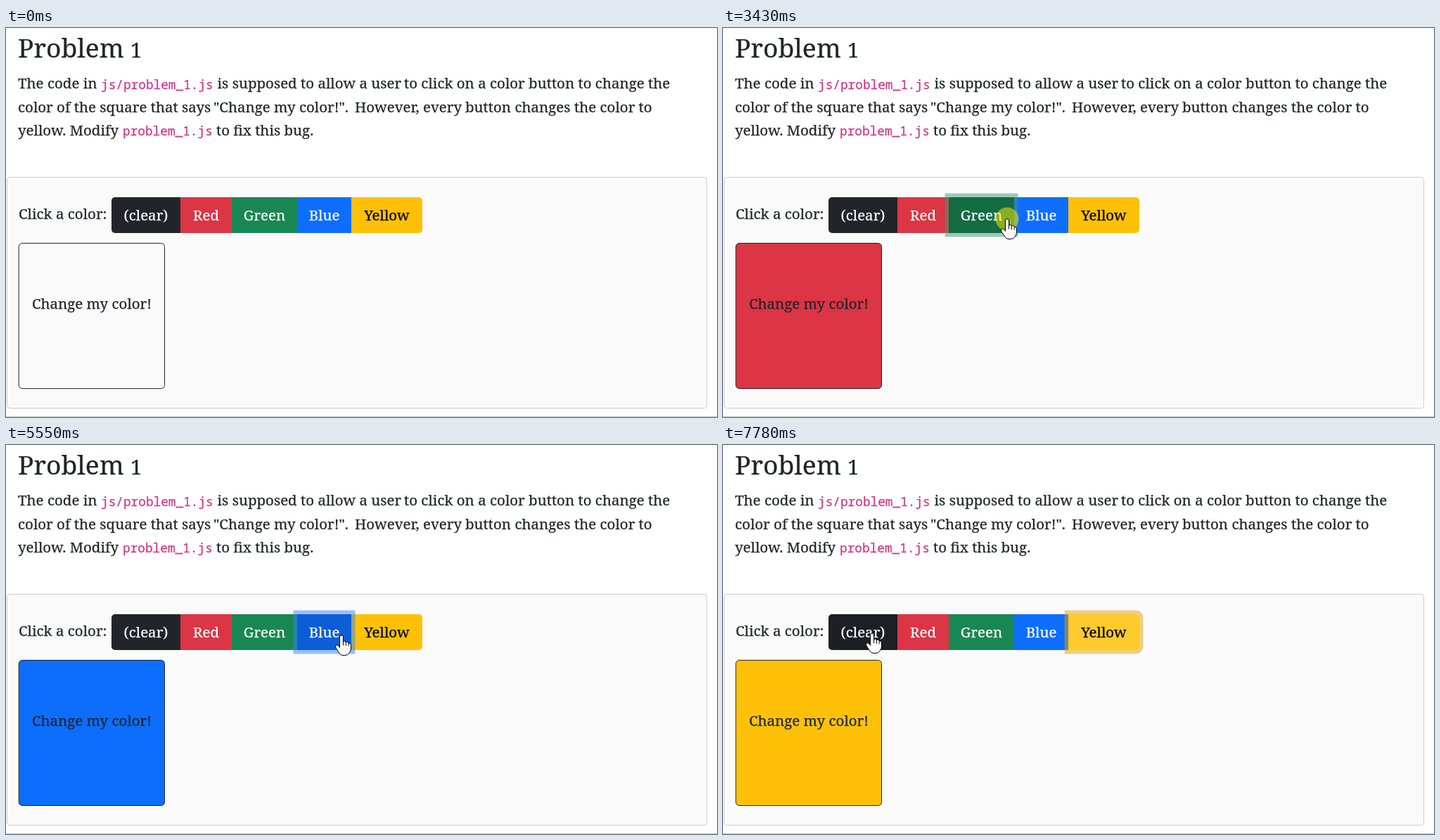
An HTML page for the animation above (8000 ms loop, 1011 px wide and 554 px high).

```html
<!DOCTYPE html>
<html lang="en">
<head>
<meta charset="utf-8">
<title>Color buttons</title>
<style>
  html, body { margin: 0; width: 100%; height: 100%; overflow: hidden; background: #fff; }
  body {
    position: relative; color: #212529;
    font: 20.5px "Noto Serif", Georgia, serif;
    -webkit-text-stroke: .25px;
  }
  svg { position: absolute; left: 0; top: 0; }
  text { fill: #212529; stroke: #212529; stroke-width: .25px; white-space: pre; }
  .code { font: 17.75px "Noto Sans Mono", monospace; fill: #d63384; stroke: #d63384; }
  .btn {
    position: absolute; top: 240.5px; height: 51.5px; line-height: 51px;
    text-align: center; color: #fff; white-space: nowrap;
  }
  .btn:first-child { border-radius: 5px 0 0 5px; }
  .btn:last-child { border-radius: 0 5px 5px 0; color: #000; }
  #overlay { z-index: 5; }
</style>
</head>
<body>
<svg width="1011" height="554">
  <text x="17" y="42" font-size="37.2">Problem</text>
  <text x="177" y="42" font-size="29">1</text>

  <text x="17" y="86">The code in</text>
  <text x="135" y="87" class="code">js/problem_1.js</text>
  <text x="300.5" y="86">is supposed to allow a user</text>
  <text x="566" y="86">to click on a</text>
  <text x="688" y="86">color button</text>
  <text x="813.5" y="86">to change the</text>

  <text x="17" y="119.5">color of the square that says</text>
  <text x="295" y="119.5">"Change my color!".</text>
  <text x="496" y="119.5">However, every</text>
  <text x="653" y="119.5">button changes</text>
  <text x="808" y="119.5">the color to</text>

  <text x="17" y="153">yellow. Modify</text>
  <text x="166" y="153" class="code">problem_1.js</text>
  <text x="299" y="153">to fix this bug.</text>

  <rect x="1.5" y="212.5" width="995" height="329" rx="4" fill="#fafafa" stroke="#ccc"/>
  <path d="M0 553.5H1011" stroke="#c4c4c4"/>
  <text x="18" y="271.5">Click a color:</text>
  <rect id="square" x="18.2" y="306.5" width="207.3" height="207" rx="5" stroke="#212529"/>
  <text x="122" y="400" text-anchor="middle">Change my color!</text>
</svg>

<div id="buttons"></div>

<svg id="overlay" width="1011" height="554">
  <g id="cursor" stroke="#000" stroke-linejoin="round" stroke-linecap="round">
    <circle id="press" r="16.5" fill="#fff000" fill-opacity=".5" stroke="none"/>
    <path id="arrow" fill="#fff" d="M0 0V24L5.5 19L9.2 27.5L13 26L9.4 17.5H17Z"/>
    <g id="hand" fill="#fff">
      <path d="M-2.5 17V2Q-2.5 0 0 0Q2.5 0 2.5 2V9Q4.5 7.2 6.4 9.5Q8.6 8.3 10.2 11Q13.5 10.5 13.5 14V19Q13.5 22 11 25.5Q9 28.5 5 28.5H2Q-1.5 28.5-3.5 25L-8 18Q-9.5 14.5-7 13.8Q-5 13.6-2.5 17Z"/>
      <path fill="none" d="M2.5 9V14M6.4 9.5V14.5M10.2 11V15"/>
    </g>
  </g>
</svg>

<script>
const LOOP = 8000, FADE = 150, SAMPLES = 10, HOLD = 210;
const $ = id => document.getElementById(id);
const CLEAR = [250, 250, 250];

// Fill colors: at rest, hovered or focused, pressed
const buttons = [
  { label: "(clear)", left: 150, right: 248, fills: [[33, 37, 41], [28, 31, 35], [26, 30, 33]], ring: [66, 70, 73] },
  { label: "Red", left: 248, right: 321, fills: [[220, 53, 69], [187, 45, 59], [176, 42, 55]], ring: [225, 83, 97] },
  { label: "Green", left: 321, right: 414, fills: [[25, 135, 84], [21, 115, 71], [20, 108, 67]], ring: [60, 153, 110] },
  { label: "Blue", left: 414, right: 491, fills: [[13, 110, 253], [11, 94, 215], [10, 88, 202]], ring: [49, 132, 253] },
  { label: "Yellow", left: 491, right: 592, fills: [[255, 193, 7], [255, 202, 44], [255, 205, 57]], ring: [217, 164, 6] }
];
const clicks = [
  { at: 1450, button: 1 }, { at: 3290, button: 2 },
  { at: 4670, button: 3 }, { at: 6420, button: 4 }
];
const moves = [
  { start: 520, end: 1120, steps: 10, from: [766, 461], to: [303, 264], dip: 0 },
  { start: 2260, end: 3020, steps: 12, from: [303, 264], to: [404, 272], dip: 18 },
  { start: 4110, end: 4600, steps: 8, from: [404, 272], to: [468, 270], dip: 0 },
  { start: 5550, end: 6090, steps: 9, from: [477, 271], to: [525, 272], dip: 0 },
  { start: 6960, end: 7780, steps: 13, from: [525, 272], to: [212, 268], dip: 0 }
];

for (const b of buttons) {
  b.el = document.createElement("div");
  b.el.className = "btn";
  b.el.textContent = b.label;
  b.el.style.left = b.left + "px";
  b.el.style.width = b.right - b.left + "px";
  $("buttons").append(b.el);
}

const rgb = (c, alpha = 1) => `rgba(${c.map(Math.round)},${alpha})`;
const lastBefore = (list, key, t) => list.filter(item => item[key] <= t).pop();

function cursorAt(t) {
  const m = lastBefore(moves, "start", t);
  if (!m) return null;
  const last = m.steps - 1;
  const step = Math.floor((t - m.start) / (m.end - m.start) * last + 1e-6);
  const p = Math.min(1, step / last);
  const e = p * p * (3 - 2 * p);
  const [x, y] = m.from.map((v, i) => v + (m.to[i] - v) * e);
  return [x, y + m.dip * Math.sin(Math.PI * e)];
}

function stateAt(t) {
  const tip = cursorAt(t);
  const click = lastBefore(clicks, "at", t);
  const inRow = tip && tip[1] > 240 && tip[1] < 292;
  return {
    tip,
    hover: inRow ? buttons.findIndex(b => tip[0] >= b.left && tip[0] < b.right) : -1,
    focus: click ? click.button : -1,
    pressed: !!click && t < click.at + HOLD
  };
}

function draw(t) {
  const now = stateAt(t);
  // Averaging the recent targets gives a linear fade between states.
  const recent = Array.from({ length: SAMPLES }, (_, i) =>
    stateAt(Math.max(0, t - i * FADE / SAMPLES)));

  buttons.forEach((b, i) => {
    const fill = [0, 0, 0];
    let ring = 0;
    for (const s of recent) {
      const level = s.focus === i ? (s.pressed ? 2 : 1) : +(s.hover === i);
      b.fills[level].forEach((v, k) => { fill[k] += v / SAMPLES; });
      if (s.focus === i) ring += 1 / SAMPLES;
    }
    b.el.style.background = rgb(fill);
    b.el.style.boxShadow = `0 0 0 ${5.5 * ring}px ${rgb(b.ring, ring / 2)}`;
    b.el.style.zIndex = now.focus === i ? 2 : now.hover === i ? 1 : 0;
  });

  const done = lastBefore(clicks, "at", t - HOLD);
  $("square").setAttribute("fill", rgb(done ? buttons[done.button].fills[0] : CLEAR));

  const show = (id, on) => { $(id).style.display = on ? "" : "none"; };
  show("cursor", now.tip);
  show("press", now.pressed);
  show("hand", now.hover >= 0);
  show("arrow", now.hover < 0);
  if (now.tip) $("cursor").setAttribute("transform", `translate(${now.tip})`);
}

const began = performance.now();
function tick() {
  draw((performance.now() - began) % LOOP);
  requestAnimationFrame(tick);
}
tick();
</script>
</body>
</html>
```
